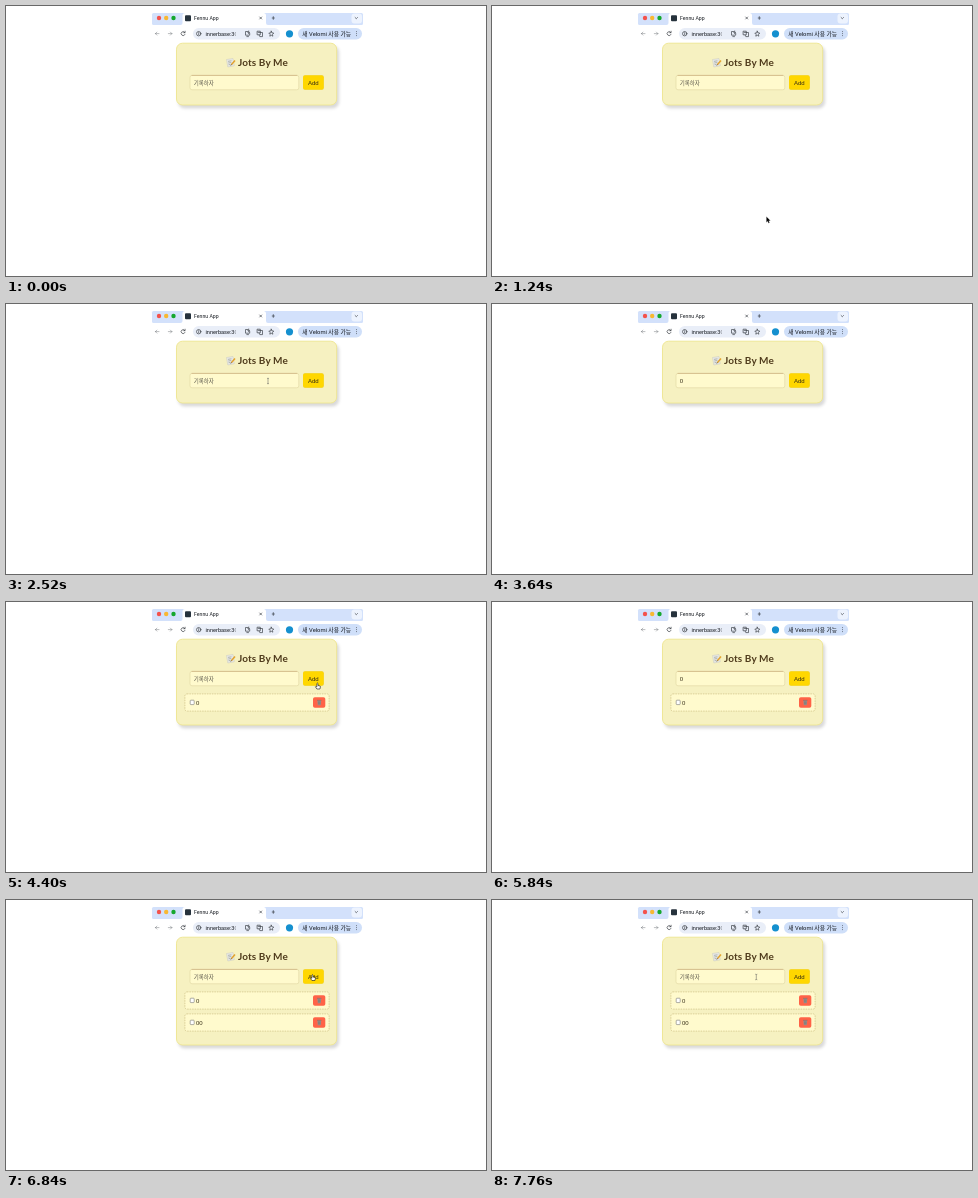
An HTML page for the animation above (8 s loop, 480 by 270 pixels).

```html
<!DOCTYPE html>
<html lang="en">
<head>
<meta charset="utf-8">
<title>Task list</title>
<style>
  html, body { margin: 0; width: 100%; height: 100%; overflow: hidden; background: #fff; }
  svg { display: block; width: 480px; height: 270px; }
  text { font-family: Roboto, "Noto Sans CJK KR", "Noto Sans CJK", sans-serif; white-space: pre; }
  .ui { fill: #14181e; }
  .line { fill: none; stroke: #30353c; stroke-width: .65; stroke-linecap: round; stroke-linejoin: round; }
  .card { fill: #f6f1c1; stroke: #efe68f; stroke-width: .9; filter: drop-shadow(2.5px 3px 1.5px rgba(0, 0, 0, .15)); }
  .title { font: 700 10px Lato, sans-serif; letter-spacing: .1px; fill: #4f3b1c; }
  .field { fill: #fffacd; stroke: #e3daa6; stroke-width: .7; }
  .edge { stroke: #cfb27e; stroke-width: .7; }
  .hint { font-size: 5.5px; fill: #5c594c; }
  .typed, .label { font: 6px "Liberation Sans", sans-serif; fill: #332b14; }
  .add { fill: #ffd700; filter: drop-shadow(.3px .7px .6px rgba(0, 0, 0, .14)); }
  .item .row { fill: #fffacd; stroke: #cdc184; stroke-width: .7; stroke-dasharray: 1.5 1; }
  .item .base { fill: #fffacd; filter: drop-shadow(.6px .7px .7px rgba(0, 0, 0, .13)); }
</style>
</head>
<body>
<svg viewBox="0 0 480 270">
  <defs>
    <g id="row" class="item">
      <rect class="base" x="179" y="92" width="144" height="17" rx="2"/>
      <rect class="row" x="178.9" y="91.9" width="144.2" height="17.2" rx="2"/>
      <rect x="184.2" y="98.2" width="4" height="4.4" rx=".7" fill="#fff" stroke="#767676" stroke-width=".6"/>
      <rect x="307" y="95.2" width="12.3" height="10.6" rx="1.8" fill="#ff6347"/>
      <path d="M311.3 98.5h3.9l-.5 4.7h-2.9z" fill="#9a8f8b"/>
      <path d="M311 98.3h4.5M312.7 99.4v3M313.9 99.4v3" stroke="#69706f" stroke-width=".5"/>
    </g>
  </defs>

  <!-- Tab strip -->
  <rect x="146" y="7" width="211" height="12" rx="1.5" fill="#d3e1fb"/>
  <path d="M174.5 19q2 0 2-2V9.500q0-2.500 2.500-2.500h78.500q2.500 0 2.500 2.500v7.500q0 2 2 2z" fill="#fff"/>
  <circle cx="153" cy="12" r="2.2" fill="#f4524c"/>
  <circle cx="160.200" cy="12" r="2.2" fill="#f8b832"/>
  <circle cx="167.500" cy="12" r="2.2" fill="#15a82f"/>
  <rect x="179" y="9.200" width="6" height="6" rx="1" fill="#26323c"/>
  <text class="ui" x="188" y="13.900" font-size="5.200">Fennu App</text>
  <path class="line" d="M253.700 11l2 2m0-2l-2 2M266.200 12h2.200m-1.100-1.400v2.800"/>
  <rect x="345.500" y="7.500" width="10.500" height="10" rx="3" fill="#edf3fe"/>
  <path class="line" d="M349.100 11.500l1.200 1.200 1.200-1.200"/>

  <!-- Toolbar -->
  <path class="line" d="M153 27.600h-3.600m1.500-1.500l-1.500 1.500 1.500 1.500M162.300 27.600h3.600m-1.500-1.500l1.500 1.500-1.500 1.500" opacity=".5"/>
  <path class="line" d="M178.900 26.600a2 2 0 1 0 .1 1.800M179.100 25.200v1.500h-1.500"/>
  <rect x="187" y="22" width="87" height="11.500" rx="5.700" fill="#e9eef8"/>
  <circle class="line" cx="192.700" cy="27.700" r="2.200"/>
  <path class="line" d="M192.700 27.500v1.200M192.700 26.300v.1"/>
  <text class="ui" x="199.500" y="29.600" font-size="5.600">innerbase:30</text>
  <rect x="229.500" y="23" width="8" height="9" fill="#e9eef8"/>
  <path class="line" d="M242 25.500h-2.500v3.700h4.200v-1.700M240.800 30.600h1.700M242.700 25v2.300m-.9-.9l.9.900.9-.9"/>
  <path class="line" d="M251.500 25.200h2.800v3.600h-2.800zM254.300 26.500h2.200v4.100h-2.700l-.6-1.400M252.200 26.400h1.400"/>
  <path class="line" d="M265.300 25.200l.7 1.700 1.800.2-1.300 1.300.3 1.800-1.500-.9-1.500.9.300-1.800-1.300-1.300 1.800-.2z"/>
  <circle cx="283.500" cy="27.800" r="3.600" fill="#1590cf"/>
  <rect x="292" y="22" width="64" height="11.500" rx="5.700" fill="#cfdff9"/>
  <text class="ui" x="296.300" y="29.700" font-size="5.800">새 Velomi 사용 가능</text>
  <path class="line" d="M350.500 25.600v.1m0 1.900v.1m0 1.900v.1"/>

  <!-- Task card -->
  <rect id="card" class="card" x="170.500" y="37.200" width="160.200" height="61.800" rx="6"/>
  <path d="M220.500 53.500l6.500-1 1.300 7.300-6.500 1.200z" fill="#e8e9e4" stroke="#bfc1ba" stroke-width=".4"/>
  <path d="M222 55.400l3.500-.6M222.300 57l3-.5M222.600 58.700l2-.3" stroke="#8c9298" stroke-width=".6"/>
  <path d="M229 54.500l-3.700 4.300" stroke="#e3a22c" stroke-width="1.500"/>
  <path d="M225.500 58.500l-.8 1" stroke="#555" stroke-width=".8"/>
  <text class="title" x="232" y="60">Jots By Me</text>
  <rect class="field" x="184" y="69.400" width="108.800" height="14.400" rx="2"/>
  <path class="edge" d="M185.500 69.400h105.800"/>
  <text id="hint" class="hint" x="187.700" y="78.500">기록하자</text>
  <text id="typed" class="typed" x="187.700" y="78.800"></text>
  <rect class="add" x="297" y="69.300" width="20.800" height="14.400" rx="2"/>
  <text class="label" x="302" y="78.600">Add</text>
  <g id="first"><use href="#row"/><text class="typed" x="190" y="102.700">0</text></g>
  <g id="second"><use href="#row" y="22"/><text class="typed" x="190" y="124.700">00</text></g>

  <g id="cursor">
    <path id="arrow" d="M0 0v5.800l1.300-1.200.9 2.100 1.100-.5-.9-2h1.800z" fill="#000" stroke="#fff" stroke-width=".2"/>
    <path id="hand" d="M-.6.500q.6-1 1.100 0v2l2 .5q.6.200.4 1l-.5 2h-3l-1.500-2.200q.1-.9 1.500 0z" fill="#fff" stroke="#111" stroke-width=".6"/>
    <path id="beam" d="M-1-2.800q1 0 1 .7 0-.7 1-.7M0-2.200v4.400M-1 2.800q1 0 1-.7 0 .7 1 .7" fill="none" stroke="#555" stroke-width=".5"/>
  </g>
</svg>
<script>
  const LOOP = 8000, STEP = 40;
  const $ = id => document.getElementById(id);
  const show = (id, on) => { $(id).style.display = on ? "" : "none"; };
  const within = (v, a, b) => v >= a && v < b;

  // start, end, from, control point, to, easing
  const easeOut = p => 1 - (1 - p) ** 4;
  const smooth = p => p * p * (3 - 2 * p);
  const moves = [
    [1120, 1720, [275, 221], [272, 170], [266.8, 138], smooth],
    [1880, 2520, [266.8, 138], [264.5, 109], [262, 77], easeOut],
    [3920, 4280, [262, 77], [290, 76], [311.5, 81], smooth],
    [4600, 5040, [311.5, 81], [305, 138], [257, 76], smooth],
    [5200, 5280, [257, 76], [256.8, 76], [256.5, 76], smooth],
    [6280, 6720, [256.5, 76], [285, 78], [306.5, 74.5], smooth],
    [6960, 7440, [306.5, 74.5], [300, 128], [264.3, 77], smooth]
  ];

  function cursorAt(t) {
    const [start, end, a, c, b, ease] = moves.findLast(m => t >= m[0]) || moves[0];
    const p = ease(Math.min(1, Math.max(0, (t - start) / (end - start))));
    return a.map((v, i) => (1 - p) ** 2 * v + 2 * p * (1 - p) * c[i] + p * p * b[i]);
  }

  function typedAt(t) {
    if (within(t, 3440, 4320) || within(t, 5840, 6000)) return "0";
    return within(t, 6000, 6760) ? "00" : "";
  }

  function drawCursor(t, one, two) {
    const [x, y] = cursorAt(t);
    const onInput = within(x, 184, 293) && within(y, 69, 84);
    const onAdd = within(x, 297, 318) && within(y, 69, 84);
    const onDelete = within(x, 307, 319.5) && (one && within(y, 95, 106) || two && within(y, 117, 128));
    show("cursor", t >= 1160 && !within(t, 3440, 3960) && !within(t, 5840, 6320));
    show("beam", onInput);
    show("hand", onAdd || onDelete);
    show("arrow", !onInput && !onAdd && !onDelete);
    $("cursor").setAttribute("transform", `translate(${x} ${y})`);
  }

  function draw(now) {
    const t = Math.floor(now % LOOP / STEP) * STEP;
    const one = t >= 4320, two = t >= 6760, typed = typedAt(t);
    show("first", one);
    show("second", two);
    $("card").setAttribute("height", two ? 107.8 : one ? 85.8 : 61.8);
    $("typed").textContent = typed;
    show("hint", !typed);
    drawCursor(t, one, two);
  }

  const began = performance.now();
  function tick() {
    draw(performance.now() - began);
    requestAnimationFrame(tick);
  }
  tick();
</script>
</body>
</html>
```
